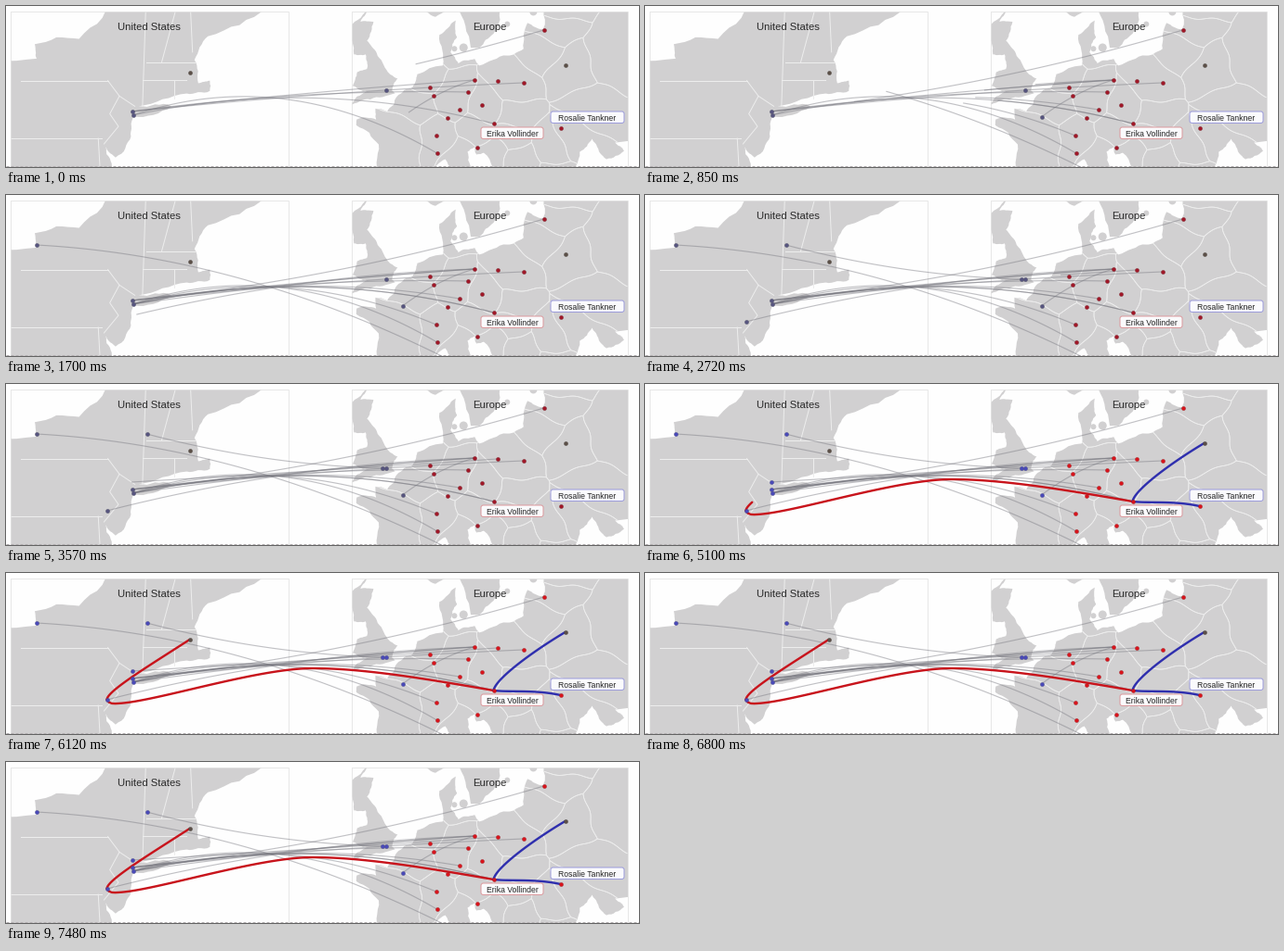
Recreate the animation shown at these times as a matplotlib script. Size 681 px wide and 174 px high, loop 7.65 s.

```python
import numpy as np
import matplotlib.pyplot as plt
from matplotlib.animation import FuncAnimation
from matplotlib.patches import Circle, FancyBboxPatch, Polygon, Rectangle

W, H, DPI = 681, 174, 100
FRAMES, STEP = 45, 170
PT = 72 / DPI
LAND, BORDER = "#d1d0d1", "#ededed"
RED, BLUE, SHADOW = "#d8141c", "#4a4ab8", "#5c5048"
DULL_RED, DULL_BLUE = "#a01828", "#57557f"
RED_PATH, BLUE_PATH = "#c8141c", "#2f2fae"
HIGHLIGHT = 3.8  # seconds

plt.rcParams["font.family"] = "Liberation Sans"
rng = np.random.default_rng(4)
fig = plt.figure(figsize=(W / DPI, H / DPI), dpi=DPI, facecolor="#fefefe")
ax = fig.add_axes([0, 0, 1, 1])
ax.set(xlim=(0.5, W + 0.5), ylim=(H + 1, 1))
ax.axis("off")


def mercator(lat):
    return np.log(np.tan(np.pi / 4 + np.radians(lat) / 2))


def roughen(p, levels=3, amount=0.1):
    """Turn a coarse outline into a coast by midpoint displacement."""
    for _ in range(levels):
        q = np.roll(p, -1, axis=0)
        normal = (q - p)[:, ::-1] * [1, -1]
        mid = (p + q) / 2 + normal * rng.uniform(-amount, amount, (len(p), 1))
        p = np.stack([p, mid], axis=1).reshape(-1, 2)
    return p


class Map:
    """A clipped panel with a Mercator projection anchored at one city."""

    def __init__(self, left, right, anchor, city, scale):
        self.anchor, self.city, self.scale = anchor, city, scale
        self.frame = Rectangle((left, 7), right - left, 180, fc="none",
                               ec="#e2e2e2", lw=0.8 * PT, zorder=3)
        ax.add_patch(self.frame)

    def project(self, coords):
        lon, lat = np.reshape(coords, (-1, 2)).T
        x = self.anchor[0] + self.scale * (lon - self.city[0])
        rise = mercator(lat) - mercator(self.city[1])
        return np.column_stack([x, self.anchor[1] - np.degrees(rise) * self.scale])

    def add(self, patch):
        ax.add_patch(patch)
        patch.set_clip_path(self.frame)
        return patch

    def land(self, *coords):
        return self.add(Polygon(roughen(self.project(coords)), fc=LAND, zorder=1))

    def island(self, lon, lat, r):
        self.add(Circle(self.project((lon, lat))[0], r, fc=LAND, zorder=1))

    def border(self, *coords):
        line, = ax.plot(*self.project(coords).T, color=BORDER, lw=PT, zorder=2)
        line.set_clip_path(self.frame)

    def divide(self, centres, land):
        """Split the land into countries: each spot belongs to the nearest centre."""
        x, y = np.meshgrid(np.arange(372, 670), np.arange(7, 176))
        wx, wy = x + 1.5 * np.sin(y / 5), y + 1.5 * np.sin(x / 6)
        dist = np.array([np.hypot(wx - cx, wy - cy) for cx, cy in self.project(centres)])
        for k in range(len(dist)):
            gap = dist[k] - np.delete(dist, k, axis=0).min(axis=0)
            edge = ax.contour(x, y, gap, levels=[0], colors=BORDER,
                              linewidths=0.8 * PT, zorder=2)
            edge.set_clip_path(land)


us = Map(5, 304, (137, 117), (-74.0, 40.72), 20.7)
us.land(-83, 42, -79, 42.85, -79.1, 43.4, -76.8, 43.6, -74.8, 45.4, -66, 45.4,
        -67, 44.8, -70.1, 43.7, -70.8, 42.8, -70.6, 41.9, -70, 42, -70, 41.6,
        -71.2, 41.5, -73.7, 41, -72, 41, -74, 40.6, -74.1, 39.8, -74.9, 38.95,
        -75.5, 39.5, -75.1, 38.7, -75.4, 37, -76.3, 37, -76.1, 39.4,
        -76.5, 37, -83, 37)
for south, west, east in [(42, -79.8, -75.3), (39.72, -81, -75.6),
                          (42.03, -73.5, -71.2), (42.72, -73.3, -70.8)]:
    us.border(west, south, east, south)
for low, high, lon, lean in [(41, 45.4, -73.5, 0.2), (42.72, 45.4, -72.5, 1),
                             (43.1, 45.4, -70.9, -0.15), (41.3, 42.03, -71.85, 0),
                             (38.4, 39.72, -75.7, -0.1)]:
    us.border(lon, low, lon + lean, high)
us.border(-75.3, 42, -74.7, 41.4, -75.2, 40.7, -74.75, 40.2, -75.5, 39.5)
us.border(-74.7, 41.4, -73.9, 41)

eu = Map(372, 669, (409, 92), (-0.13, 51.5), 7.02)
continent = eu.land(
    -1.6, 42, -1.2, 46, -4.6, 48, -4.6, 48.6, -1.6, 48.6, -1.7, 49.7, 0.1, 49.4,
    1.6, 50.9, 4, 51.8, 4.7, 53, 8.6, 53.8, 8.1, 56.5, 10.6, 57.7, 10.8, 56.3,
    9.8, 55, 11, 54, 13.5, 54.4, 14.2, 53.8, 18.5, 54.7, 21, 55.3, 21.6, 57.5,
    24, 57, 24.4, 60, 44, 60, 44, 47.2, 35, 46.2, 36.4, 45.3, 33.7, 44.4,
    32.5, 45.4, 31.5, 46.6, 29.6, 45.2, 28.4, 42, 18, 42, 14.9, 45.1,
    13.8, 44.9, 13.5, 45.7, 12.4, 45.2, 12.5, 44.3, 14, 42, 11, 42, 9, 44.4,
    6.5, 43.1, 3.1, 43)
eu.land(-3, 58.6, -4, 57.6, -2, 57.6, -3, 56, -1.5, 54.9, 0.2, 53.2, 1.7, 52.6,
        0.8, 51.5, 1.3, 51.2, -2.5, 50.6, -5.7, 50.1, -3, 51.4, -5.2, 51.9,
        -4.5, 53.2, -3, 53.5, -3.2, 54.8, -5, 54.8, -6, 57)
eu.land(5.6, 58.7, 7.5, 58, 11, 59, 12.9, 55.4, 14.2, 55.4, 16.4, 56.6, 17.5, 59)
for lon, lat, r in [(11.8, 55.4, 4.5), (10.4, 55.3, 3), (18.5, 57.4, 3), (22.5, 58.4, 4)]:
    eu.island(lon, lat, r)
# rough middle of each country, west to east
eu.divide([2.5, 46.7, 4.6, 50.4, 5.6, 52.4, 8, 46.6, 9.4, 56.2, 10.2, 50.8,
           11.3, 44.9, 13.9, 47.3, 15.3, 49.8, 15.9, 45.2, 19.2, 47.1,
           19.3, 52, 19.5, 48.8, 20.8, 44.2, 24, 55.3, 25, 45.8, 25.2, 56.9,
           25.6, 59, 25.3, 42, 28.2, 53.5, 28.7, 47, 31, 49.6, 34.5, 54.5], continent)

ax.plot((0, W), (174, 174), color="#b4b0b2", lw=PT, ls=(0, (3, 2)), zorder=3)


def bezier(*pts):
    t = np.linspace(0, 1, 80)[:, None]
    layer = [np.array(p, float) for p in pts]
    while len(layer) > 1:
        layer = [(1 - t) * p + t * q for p, q in zip(layer, layer[1:])]
    return layer[0]


def voyage(start, end, lift=0):
    """Ocean crossing: the lower its ends, the more it bows up to the bundle."""
    x, y = (np.array(start) + end) / 2
    mid_y = 103 - 21 * np.exp((71 - y) / 25) - lift
    return bezier(start, (x, 2 * mid_y - y), end)


class Trail:
    """A path that draws itself between two times."""

    def __init__(self, path, t0, t1, **style):
        self.path, self.t0, self.t1 = path, t0, t1
        self.dist = np.r_[0, np.cumsum(np.hypot(*np.diff(path, axis=0).T))]
        self.line, = ax.plot([], [], **style)

    def update(self, t):
        part = np.clip((t - self.t0) / (self.t1 - self.t0), 0, 1)
        d = np.linspace(0, part * self.dist[-1], 120 if part else 0)
        self.line.set_data(*(np.interp(d, self.dist, c) for c in self.path.T))


BERLIN, LEIPZIG, WARSAW, POZNAN = (504, 81), (497, 94), (557, 84), (529, 82)
VIENNA, RIGA, FRANKFURT, GENEVA = (525, 128), (579, 27), (488, 113), (463, 141)
MARSEILLE, CZERNOWITZ, MINSK = (464, 160), (597, 133), (602, 65)
LONDON, OXFORD, PARIS = (409, 92), (405, 92), (427, 121)
NEW_YORK, BROOKLYN, BRONX = (136, 115), (137, 119), (136, 107)
BUFFALO, VERMONT, PHILLY, BOSTON = (33, 55), (152, 55), (109, 138), (198, 73)

thin = dict(color="#77777f", alpha=0.45, lw=1.15 * PT, zorder=4)
trails = [Trail(voyage(city, NEW_YORK), -2, -1, **thin)
          for city in (BERLIN, LEIPZIG, WARSAW)]
trails += [Trail(voyage(city, BROOKLYN), -2, -1, **thin) for city in (VIENNA, MARSEILLE)]
trails += [Trail(voyage(city, BROOKLYN), 0.4, 1.6, **thin)
           for city in (BERLIN, VIENNA, FRANKFURT, GENEVA)]
trails += [
    Trail(bezier(BERLIN, (464, 93), PARIS), -0.9, 0.1, **thin),
    Trail(voyage(RIGA, NEW_YORK), -0.55, 1.2, **thin),
    Trail(voyage((475, 178), BUFFALO, 8), 0.2, 1.5, **thin),
    Trail(voyage(BERLIN, PHILLY), 0.6, 1.8, **thin),
    Trail(voyage(OXFORD, VERMONT, 3), 1.7, 2.6, **thin),
    Trail(voyage(POZNAN, BRONX), 2.5, 3.57, **thin),
]

crest, turn = (330, 104), (120, 142)
red_out = np.vstack([bezier(VIENNA, (440, 113), (380, 104), crest),
                     bezier(crest, (270, 104), (158, 141), turn),
                     bezier(turn, (111, 143), PHILLY)])
bold = dict(lw=2.4 * PT, zorder=6, solid_capstyle="round")
trails += [
    Trail(red_out, HIGHLIGHT, 4.95, color=RED_PATH, **bold),
    Trail(bezier(PHILLY, (109, 129), (150, 104), BOSTON), 5, 5.95, color=RED_PATH, **bold),
    Trail(bezier(CZERNOWITZ, (570, 127), (545, 130), VIENNA), HIGHLIGHT, 4.35,
          color=BLUE_PATH, **bold),
    Trail(bezier(VIENNA, (527, 115), (570, 84), MINSK), 4.35, 5.05,
          color=BLUE_PATH, **bold),
]


def dots(*pts, color=BLUE):
    return ax.plot(*np.transpose(pts), "o", ms=4.4 * PT, mfc=color,
                   mec="#33333355", mew=0.4 * PT, zorder=7)[0]


red_dots = dots(RIGA, BERLIN, WARSAW, VIENNA, POZNAN, LEIPZIG, FRANKFURT, GENEVA,
                MARSEILLE, CZERNOWITZ, (456, 89), (460, 98), (512, 108),
                (475, 122), (507, 154), color=RED)
dots(BOSTON, MINSK, color=SHADOW)
blue_dots = [(t, dots(p)) for p, t in
             [(LONDON, 0), (NEW_YORK, 0), (BROOKLYN, 0), (PARIS, 0.1), (BUFFALO, 1.5),
              (OXFORD, 1.75), (PHILLY, 1.8), (VERMONT, 2.6), (BRONX, 3.65)]]


def tag(x, y, w, name, edge):
    ax.add_patch(FancyBboxPatch((x, y), w, 12.5, fc="#fafafc", ec=edge, lw=PT, zorder=8,
                                boxstyle="round,pad=0,rounding_size=2.5"))
    ax.text(x + w / 2, y + 6.7, name, size=8.7 * PT, color="#222222",
            ha="center", va="center_baseline", zorder=9)


tag(511.5, 132, 67, "Erika Vollinder", "#dc9a9e")
tag(586.5, 115, 79, "Rosalie Tankner", "#9c9cdc")
for x, title in [(154, "United States"), (521, "Europe")]:
    ax.text(x, 23, title, size=11.3 * PT, color="#2a2a2a",
            ha="center", va="center_baseline", zorder=9)


def draw(i):
    t = i * STEP / 1000
    for trail in trails:
        trail.update(t)
    bright = t >= HIGHLIGHT
    red_dots.set_markerfacecolor(RED if bright else DULL_RED)
    for start, dot in blue_dots:
        dot.set_markerfacecolor(BLUE if bright else DULL_BLUE)
        dot.set_visible(t >= start)
    return []


anim = FuncAnimation(fig, draw, frames=FRAMES, interval=STEP, repeat=True,
                     repeat_delay=0, init_func=lambda: draw(0))
plt.show()
```
